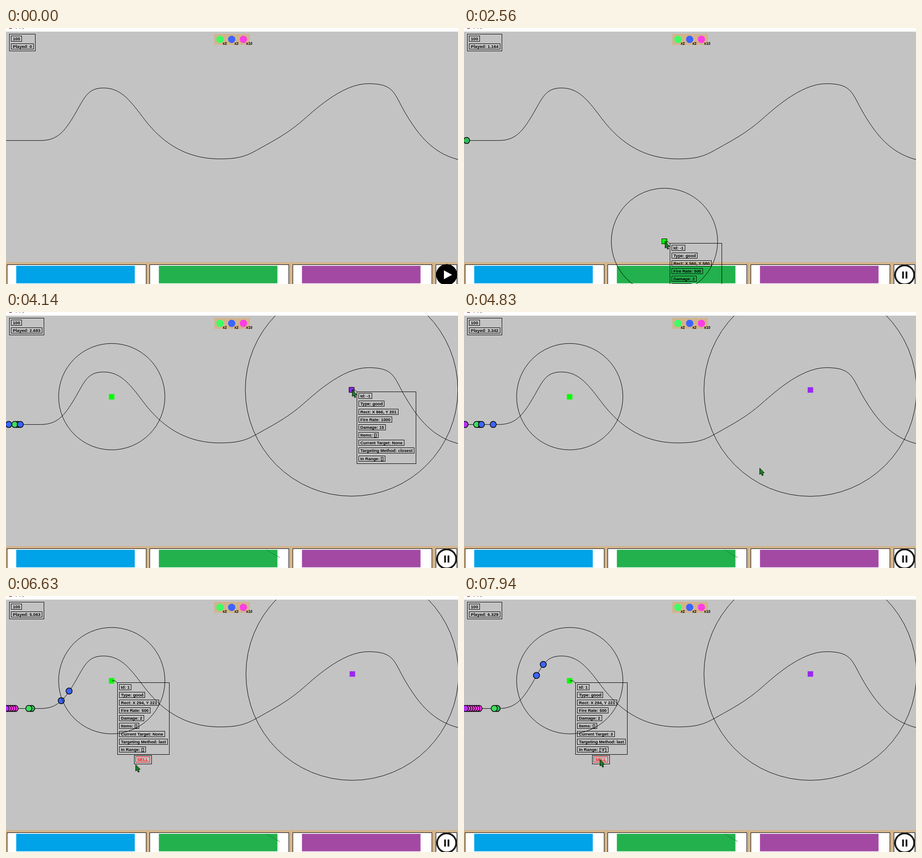
Recreate the animation shown at these times as an HTML page with a canvas. Size 995 px wide and 563 px high, loop 7990 ms.

```html
<!DOCTYPE html>
<html lang="en">
<head>
<meta charset="utf-8">
<title>Tower game</title>
<style>
  html, body { margin: 0; width: 100%; height: 100%; overflow: hidden; background: #c3c3c3; }
  canvas { display: block; }
</style>
</head>
<body>
<canvas id="stage" width="995" height="563"></canvas>
<script>
const g = document.getElementById('stage').getContext('2d');
const LOOP = 7990, START = 1360, TICK = 52.64;
const TAN = '#d2b48c', GREEN = '#00ff00', VIOLET = '#9b26f0';

const curve = `M0 247 H76 C112 247 128 228 150 191 S178 131.5 214 131.5
  S270 155 300 195 S380 287.5 470 287.5 C522 287.5 534 278 570 258
  S625 226 650 205 S738 122 797 122 S853 144 880 189 S938 274.5 995 289`;
const track = document.createElementNS('http://www.w3.org/2000/svg', 'path');
track.setAttribute('d', curve);
const trackLine = new Path2D(curve);

// Cursor moves: start, end, x, y
const moves = [
  [0, 149, 970, 539], [580, 860, 953, 486], [900, 1160, 965, 543],
  [1800, 2320, 495, 541], [2430, 2920, 234, 187], [3060, 3255, 283.5, 273],
  [3260, 3600, 696, 541], [3720, 4140, 762.3, 171.8], [4640, 4950, 600, 422],
  [4950, 5560, 235.5, 181], [5800, 6250, 285.5, 352], [6300, 6620, 285.5, 371],
  [6660, 6900, 299.5, 360]
];

function cursorAt(t) {
  let x = 976, y = 566;
  for (const [from, to, toX, toY] of moves) {
    const u = Math.min(Math.max((t - from) / (to - from), 0), 1);
    const ease = u * u * (3 - 2 * u);
    x += (toX - x) * ease;
    y += (toY - y) * ease;
  }
  return [x, y];
}

function fill(x, y, w, h, color) { g.fillStyle = color; g.fillRect(x, y, w, h); }

function frame(x, y, w, h, color = '#000') {
  g.strokeStyle = color; g.lineWidth = 1;
  g.strokeRect(Math.floor(x) + .5, Math.floor(y) + .5, Math.round(w), Math.round(h));
}

function disc(x, y, r, color, line, width = 1) {
  g.beginPath(); g.arc(x, y, r, 0, 7);
  if (color) { g.fillStyle = color; g.fill(); }
  if (line) { g.strokeStyle = line; g.lineWidth = width; g.stroke(); }
}

function poly(points, color, line, closed = true) {
  g.beginPath();
  points.forEach(([x, y]) => g.lineTo(x, y));
  if (closed) g.closePath();
  if (color) { g.fillStyle = color; g.fill(); }
  if (line) { g.strokeStyle = line; g.lineWidth = 1; g.stroke(); }
}

function text(s, x, y, size = 9.3, color = '#000') {
  g.font = `bold ${size}px "Liberation Sans", Arial, sans-serif`;
  g.fillStyle = color;
  g.fillText(s, x, y);
  return g.measureText(s).width;
}

// Text in a tight box; returns the box width
function label(s, x, y, size, color) {
  x = Math.floor(x); y = Math.floor(y);
  const w = text(s, x + 4, y + 9.6, size, color) + 7;
  frame(x, y, w, 12, color);
  return w;
}

function drawTrack() {
  g.strokeStyle = '#000'; g.lineWidth = 1;
  g.save();
  g.translate(.5, .4);
  g.stroke(trackLine);
  g.restore();
}

function drawScore(played) {
  label('100', 11, 17, 9.6);
  const w = label('Played: ' + +played.toFixed(3), 11, 34, 9.6);
  frame(7, 13, w + 8, 37);
}

function drawTray() {
  fill(458.5, 13, 78.5, 24, TAN);
  ['#3cff64', '#3c64ff', '#ff3ce6'].forEach((color, i) => {
    const x = 471 + i * 25.8;
    disc(x, 25, 8, color);
    text(i < 2 ? 'x2' : 'x10', x + 6, 36.8, 8.2);
  });
}

function drawShop(running, worn) {
  fill(0, 515, 995, 48, TAN);
  ['#00a2e8', '#22b14c', '#a349a4', null].forEach((color, i) => {
    const x = Math.round(1.6 + i * 314.8), w = color ? 306 : 46;
    fill(x, 520, w, 50, '#fff');
    frame(x, 520, w, 50);
    if (color) fill(x + 20.5, 523, 261, 38.5, color);
  });
  if (worn) poly([[574, 523], [588, 532], [602.5, 540]], null, '#187d36', false);
  if (running) {
    disc(970, 543, 21, '#fff', '#1a1a1a', 3.8);
    fill(964.5, 535.5, 4, 15.5, '#1a1a1a');
    fill(972, 535.5, 4, 15.5, '#1a1a1a');
  } else {
    disc(970, 542.5, 23.2, '#000');
    poly([[964, 533], [964, 552.5], [982, 542.8]], '#fff');
  }
}

function ball(distance, color) {
  if (distance <= 0) return;
  const { x, y } = track.getPointAtLength(distance);
  disc(x, y + .3, 6.8, color, '#000', 1.5);
}

function drawBalls(t) {
  ball((t - 2110) * .0125, '#37b859');
  ball((t - 2610) * .0125, '#3fdc62');
  for (const spawn of [3480, 4020]) {
    const s = Math.max(t - spawn, 0) / 1000;
    ball(46.5 * s + .73 * s * s, '#3c64ff');
  }
  for (let i = 0; i < 8; i++) {
    const x = (t - 4600 - i * 505) * .0099;
    ball(x, x < 4 ? '#b432f5' : '#fa3ce6');
  }
}

function drawTower(x, y, range, color, held) {
  disc(x, y, range, null, '#000');
  fill(Math.floor(x) - 5.5, Math.floor(y) - 5.5, 12, 12, color);
  if (held) frame(x - 5.5, y - 5.5, 11, 11);
}

function drawInfo(x, y, rows) {
  const px = x + 12, py = y + 4.3;
  const widths = rows.map((s, i) => label(s, px + 4, py + 3.5 + i * 17.15));
  frame(px, py, Math.max(...widths) + 8, 158);
  poly([[x, y + .2], [x + 7, y + .2], [x + 12, py + .5]], null, '#000', false);
}

function infoRows(id, rect, rate, damage, method, target = 'None', inRange = '') {
  return ['Id: ' + id, 'Type: good', 'Rect: ' + rect, 'Fire Rate: ' + rate, 'Damage: ' + damage,
    'Items: []', 'Current Target: ' + target, 'Targeting Method: ' + method, `In Range: [${inRange}]`];
}

function drawHeld(x, y, range, color, ...stats) {
  const rect = `X ${Math.round(x * 1.27)}, Y ${Math.round((y - 12.5) * 1.27)}`;
  drawTower(x, y, range, color, true);
  drawInfo(x, y, infoRows(-1, rect, ...stats));
}

function drawCursor(x, y) {
  const shape = [[0, 0], [0, 14], [3, 11.3], [5.3, 16.5], [8, 15.4], [5.8, 10.3], [10, 10.2]];
  poly(shape.map(([dx, dy]) => [x + dx, y + dy]), '#1c8228', '#000');
}

function drawTitle() {
  fill(0, 0, 995, 8, '#fff');
  fill(7, 0, 6, 2, '#b86a62');
  g.font = '11px "Open Sans", sans-serif';
  g.fillStyle = '#555';
  g.fillText('1 79', 19, 2);
}

function draw(time) {
  const tick = Math.floor((time - START) / TICK + .25);
  const t = START + tick * TICK;
  const [cx, cy] = cursorAt(t);
  const hx = cx - 1.5, hy = cy - .8;

  fill(0, 0, 995, 563, '#c3c3c3');
  drawTrack();
  drawScore(Math.max(tick, 0) * .05063);
  drawTray();
  drawShop(tick >= 0, t > 3900);
  drawBalls(t);

  if (t > 2960) drawTower(232.8, 186.2, 117, GREEN);
  else if (t > 2400) drawHeld(hx, hy, 117, GREEN, 500, 2, 'last');

  if (t > 4420) drawTower(762.2, 171.4, 234, VIOLET);
  else if (t > 3700) drawHeld(hx, hy, 234, '#8a2be2', 1000, 15, 'closest');

  if (t > 5700) {
    const found = t > 6850 ? ['3', "'3'"] : [];
    drawInfo(233, 186.3, infoRows(1, 'X 294, Y 221', 500, 2, 'last', ...found));
    frame(282, 350, 38, 19);
    label('SELL', 285, 353, 9.5, '#f00');
  }

  drawCursor(cx, cy);
  drawTitle();
}

const begin = performance.now();
function loop() {
  draw((performance.now() - begin) % LOOP);
  requestAnimationFrame(loop);
}
loop();
</script>
</body>
</html>
```
